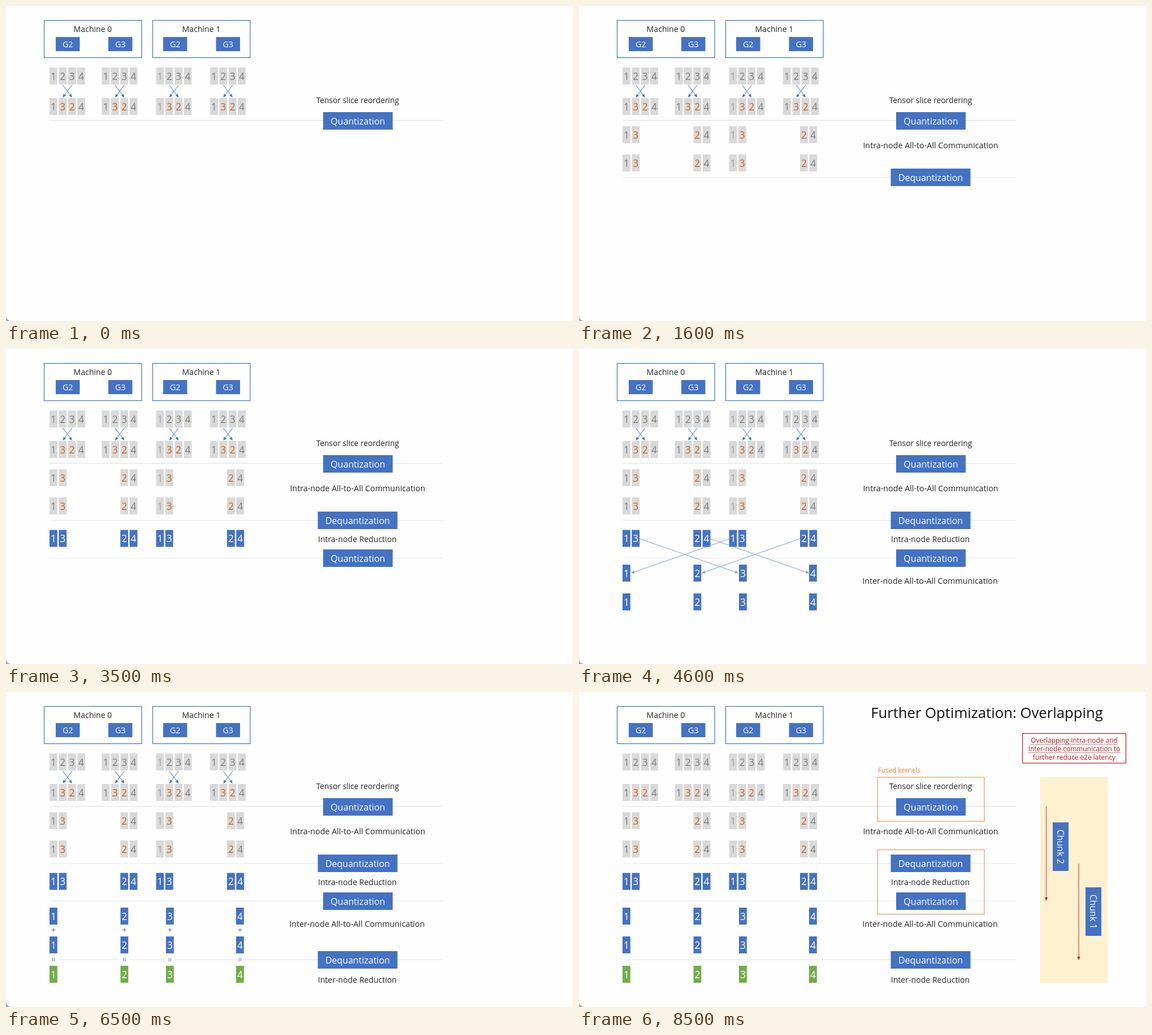
An HTML page for the animation above (9500 ms loop, 1003 by 558 pixels).

```html
<!DOCTYPE html>
<html lang="en">
<head>
<meta charset="utf-8">
<title>Quantized gradient communication</title>
<style>
html, body { margin: 0; width: 100%; height: 100%; overflow: hidden; background: #fefefe; }
svg { display: block; width: 1003px; height: 558px; }
text { font-family: "Open Sans", "Noto Sans", sans-serif; text-anchor: middle; }
</style>
</head>
<body>
<svg id="stage" viewBox="0 0 1003 558"></svg>
<script>
const stage = document.getElementById('stage');
const BLUE = '#4472c4', GREY = '#d9d9d9', GREEN = '#70ad47', ORANGE = '#c8651f', RED = '#c0181c';
const INK = '#262626', PITCH = 16.4;
const STEPS = [600, 1600, 2600, 3500, 4600, 5600, 6500, 7500, 8500];
const LOOP = 9500;
const layers = [];
let layer;

function add(tag, attrs, parent = layer) {
  const el = document.createElementNS('http://www.w3.org/2000/svg', tag);
  for (const k in attrs) el.setAttribute(k, attrs[k]);
  return parent.appendChild(el);
}

// Everything drawn after this call is visible in steps first..last.
function during(first, last = 9) {
  layer = add('g', {}, stage);
  layers.push({ el: layer, first, last });
}

function box(x, y, right, bottom, fill, stroke = 'none') {
  add('rect', { x, y, width: right - x, height: bottom - y, fill, stroke, 'stroke-width': 1.2 });
}

function label(str, x, y, size = 14.1, fill = INK, extra = {}) {
  add('text', { x, y: y + size * 0.357, 'font-size': size, fill, ...extra }).textContent = str;
}

function button(str, x, y, right, bottom, size = 16) {
  box(x, y, right, bottom, BLUE);
  label(str, (x + right) / 2, (y + bottom) / 2 + 0.4, size, '#fff');
}

const quantize = y => button('Quantization', 561, y - 15.5, 684, y + 15.5);
const dequantize = y => button('Dequantization', 551.5, y - 15.5, 692.5, y + 15.5);

function rule(y, stroke = '#e3e8f3') {
  add('path', { d: `M77 ${y}H773`, stroke });
}

function arrow(x1, y1, x2, y2, color = BLUE, width = 1, head = 6) {
  const a = Math.atan2(y2 - y1, x2 - x1), c = Math.cos(a), s = Math.sin(a), w = head * 0.45;
  const bx = x2 - head * c, by = y2 - head * s;
  add('path', { d: `M${x1} ${y1}L${bx} ${by}`, stroke: color, 'stroke-width': width });
  add('path', { d: `M${x2} ${y2}L${bx - w * s} ${by + w * c}L${bx + w * s} ${by - w * c}Z`, fill: color });
}

function cell(n, x, y, fill, ink) {
  box(x, y - 15, x + 13.8, y + 15, fill);
  label(n, x + 6.9, y + 0.4, 17.5, ink);
}

const groups = [77, 169.5, 265.5, 361];
const pairs = [['13', 77], ['24', 202.3], ['13', 265.5], ['24', 391]];
const singles = [77, 202.5, 283, 407];

function slices(digits, x, y, swapped) {
  [...digits].forEach((n, i) => {
    const faint = n === '1' && x === 265.5;
    const ink = swapped && (n === '2' || n === '3') ? ORANGE : faint ? '#a3a3a3' : '#7f7f7f';
    cell(n, x + i * PITCH, y, GREY, ink);
  });
}

function singleRow(y, fill) {
  singles.forEach((x, i) => cell(i + 1, x, y, fill, '#fff'));
}

function operators(xs, plusY, equalY) {
  for (const x of xs) {
    box(x - 10, equalY - 3, x + 10, equalY + 3, '#fefefe');
    add('path', { d: `M${x - 3.5} ${plusY}h7m-3.5 -3.5v7`, stroke: BLUE, fill: 'none' });
    add('path', { d: `M${x - 1.5} ${equalY - 3}v6m3 -6v6`, stroke: BLUE, fill: 'none' });
  }
}

// Machines and the slice reordering
during(0);
add('path', { d: 'M0 549Q1 557 9 558H0Z', fill: '#a8a8a8' });
[[67.5, 88, 181], [259.5, 278, 371.5]].forEach(([x, a, b], i) => {
  box(x, 25.5, x + 172.5, 91.5, 'none', BLUE);
  label('Machine ' + i, x + 86, 41);
  button('G2', a, 55, a + 42.5, 80, 14.4);
  button('G3', b, 55, b + 42.5, 80, 14.4);
});
for (const x of groups) {
  slices('1234', x, 124);
  slices('1324', x, 178, true);
}
label('Tensor slice reordering', 622, 167, 13.8);
rule(202.5, '#d5deef');
quantize(203.5);

during(0, 7);
for (const x of groups) {
  const l = x + 23.4, r = x + 39.8;
  arrow(l, 140, r, 162);
  arrow(r, 140, l, 162);
}

// Exchange inside each machine
during(1);
for (const y of [228, 278]) pairs.forEach(([d, x]) => slices(d, x, y, true));
label('Intra-node All-to-All Communication', 622, 247, 14.3);

during(1, 1);
for (const [l, r] of [[0, 1], [2, 3]]) {
  arrow(groups[l] + 48, 194, pairs[r][1] - 1, 228, '#7c9dd8', 1);
  arrow(groups[r] + 15, 194, pairs[l][1] + 31, 228, '#7c9dd8', 1);
}

during(2);
rule(303.5);
dequantize(303.5);

during(3);
for (const [d, x] of pairs) [...d].forEach((n, i) => cell(n, x + i * PITCH, 335.5, BLUE, '#fff'));
label('Intra-node Reduction', 621.5, 337);

during(3, 3);
operators(pairs.map(p => p[1] + 15), 252.5, 306);

during(4);
rule(370);
quantize(370.5);

// Exchange between machines
during(5);
singleRow(397, BLUE);
singleRow(448, BLUE);
label('Inter-node All-to-All Communication', 621, 411, 14.3);

during(5, 5);
for (const [x1, x2] of [[107, 282], [232, 407], [267, 92], [391, 217]])
  arrow(x1, 336, x2, 397, '#7c9dd8', 1);

during(6);
rule(474, '#dde4f1');
dequantize(474.5);

during(7);
singleRow(500, GREEN);
label('Inter-node Reduction', 621.5, 510);

during(7, 7);
operators(singles.map(x => x + 6.9), 421.5, 474);

// Kernel fusion
during(8);
label('Fused kernels', 566.5, 138.5, 11.7, '#e8843c');
box(528, 151, 717, 229, 'none', '#e8955c');
box(528, 279.5, 717, 393.5, 'none', '#e8955c');

during(8, 8);
label('Further Optimization: Kernel Fusion', 721.5, 37, 25.7, '#111');
box(784.5, 82, 967.5, 118.5, '#fff', RED);
label('Kernel Fusion to reduce the', 876, 93, 11.8, RED);
add('path', { d: 'M800 98.5H873', stroke: RED, 'stroke-width': 0.7 });
label('memory I/O times', 876.5, 108, 11.8, RED);
arrow(876, 119, 717, 190, RED);
arrow(876, 119, 717, 336, RED);

// Overlapping
during(9);
label('Further Optimization: Overlapping', 721.5, 37, 25.7, '#111');
box(784.5, 73.5, 967.5, 126, '#fff', RED);
['Overlapping Intra-node and', 'Inter-node communication to', 'further reduce e2e latency']
  .forEach((s, i) => label(s, 876, 86 + i * 15, 11.9, RED));
add('path', { d: 'M798 92.5H953M794 107.5H958', stroke: RED, 'stroke-width': 0.6 });
box(815.5, 151, 935.5, 516, '#fff0cf');
arrow(826.5, 203, 826.5, 370, RED, 0.9);
arrow(884, 304, 884, 475, RED, 0.9);
for (const [s, x, y] of [['Chunk 2', 852, 274], ['Chunk 1', 910, 389]]) {
  box(x - 14, y - 43, x + 14, y + 43, BLUE);
  label(s, 0, 0, 16, '#fff', { transform: `translate(${x} ${y}) rotate(90)` });
}

function draw() {
  const t = performance.now() % LOOP;
  const step = STEPS.filter(s => t >= s).length;
  for (const { el, first, last } of layers)
    el.style.display = step >= first && step <= last ? '' : 'none';
  requestAnimationFrame(draw);
}
draw();
</script>
</body>
</html>
```
